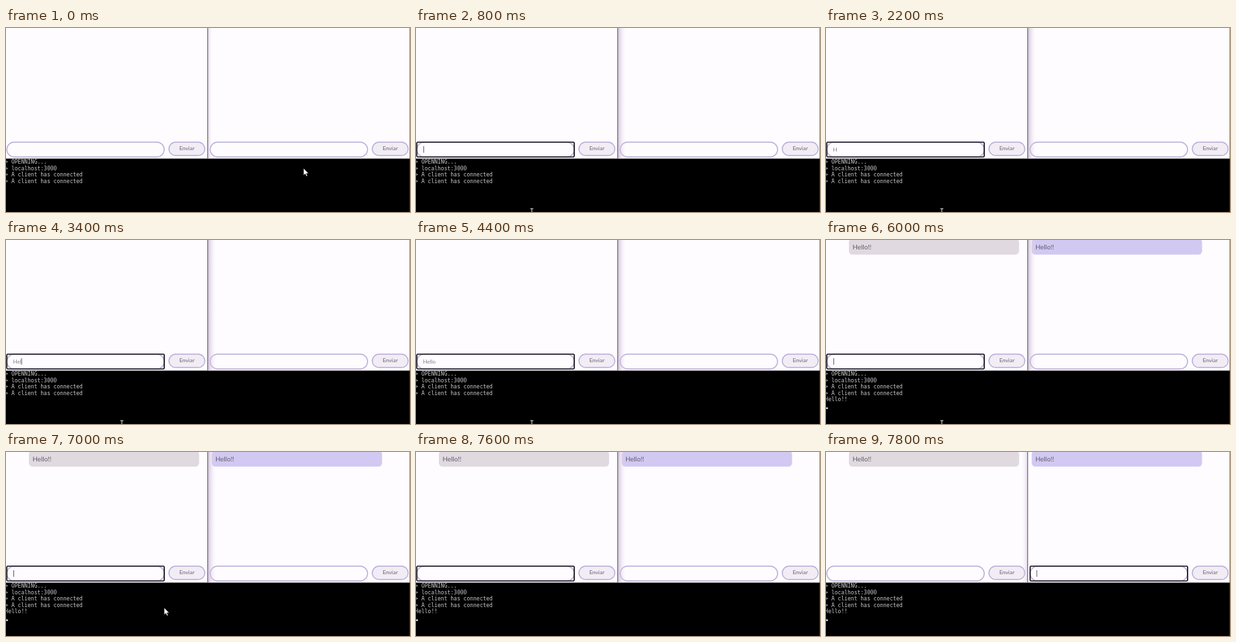
Write an HTML page that moves like this. It is 600x274 px and loops after 8000 ms.

```html
<!DOCTYPE html>
<html lang="es">
<head>
<meta charset="utf-8">
<title>Chat</title>
<style>
  html, body { margin: 0; width: 100%; height: 100%; overflow: hidden; background: #000; }
  svg { display: block; width: 100%; height: 100%; }
  text { font-family: Lato, "Open Sans", sans-serif; white-space: pre; }
  .field { fill: #fefcff; stroke: #b9abd9; stroke-width: 1.4; }
  .button { fill: #f2ecf5; stroke: #b9abd9; stroke-width: 1.4; }
  .label { font-size: 8.3px; fill: #6b646f; text-anchor: middle; }
  .focus { fill: none; stroke: #15111c; stroke-width: 1.7; }
  .typed { font-size: 8px; fill: #85798c; }
  .message { font-size: 9.8px; fill: #625b68; }
  .terminal text { font: 8px "DejaVu Sans Mono", monospace; fill: #c8c8c8; }
  .caret { fill: #55465f; }
</style>
</head>
<body>
<svg viewBox="0 0 600 274" preserveAspectRatio="none">
  <defs>
    <linearGradient id="shade">
      <stop offset="0" stop-color="#bda9c6" stop-opacity=".7"/>
      <stop offset=".4" stop-color="#d9c8e0" stop-opacity=".45"/>
      <stop offset="1" stop-color="#eadff0" stop-opacity="0"/>
    </linearGradient>
    <g id="chat">
      <rect class="field" x="1.2" y="170" width="233.8" height="22" rx="11"/>
      <rect class="button" x="242" y="170" width="53.3" height="19.8" rx="9.9"/>
      <text class="label" x="268.7" y="182.3">Enviar</text>
    </g>
    <rect id="ring" class="focus" x="1.2" y="170" width="233.8" height="22" rx="1.5"/>
  </defs>

  <rect width="600" height="274"/>
  <rect width="600" height="194.5" fill="#fefcff"/>

  <g id="messages">
    <rect x="34" y="-2" width="252.7" height="23.8" rx="5.5" fill="#e0d9e0"/>
    <text class="message" x="39.5" y="13.8">Hello!!</text>
    <rect x="305.5" y="-2" width="253" height="23.8" rx="5.5" fill="#d2c9f2"/>
    <text class="message" x="311" y="13.8">Hello!!</text>
  </g>

  <use href="#chat"/>
  <use href="#chat" x="302"/>
  <rect id="shadow" y="0" height="194.5" fill="url(#shade)"/>
  <rect x="298.9" width="1.2" height="194.5" fill="#716a76"/>
  <rect x="599.2" width=".8" height="194.5" fill="#8d7b82"/>
  <rect x="599.2" y="194.5" width=".8" height="79.5" fill="#6e1818"/>

  <use id="focusLeft" href="#ring"/>
  <use id="focusRight" href="#ring" x="302"/>
  <text id="typed" class="typed" x="10.6" y="183.7"></text>
  <path id="spelling" fill="none" stroke="#e0557f" stroke-width=".9"/>
  <rect id="caret" class="caret" y="176" width=".9" height="9.8"/>

  <g class="terminal">
    <text x="-1.7" y="202.4">&gt; OPENNING...</text>
    <text x="-1.7" y="211.9">&gt; localhost:3000</text>
    <text x="-1.7" y="221.4">&gt; A client has connected</text>
    <text x="-1.7" y="230.9">&gt; A client has connected</text>
    <g id="log">
      <text x="-1.7" y="240.4">Hello!!</text>
      <rect x="0" y="249.5" width="3" height="2" fill="#eee"/>
    </g>
  </g>

  <path id="arrow" d="M0 0V10.2L2.4 8 4 11.7 5.6 11 4 7.4H7.2Z" fill="#fff" stroke="#222" stroke-width=".5"/>
  <path id="beam" d="M-2.3 0H2.3M0 0V8M-2.3 8H2.3" fill="none" stroke-width="1"/>
</svg>
<script>
const LOOP = 8000;
const $ = id => document.getElementById(id);
const show = (id, on) => $(id).style.display = on ? "" : "none";

// Each table holds [start in ms, value...]; the latest started row applies.
const typing = [[0, ""], [1600, "H"], [3200, "He"], [3400, "Hel"], [3600, "Hell"],
  [3800, "Hello"], [5000, "Hello!"], [5200, "Hello!!"], [6000, ""]];
const blink = [[0, false], [800, true], [1400, false], [1600, true], [2200, false],
  [2800, true], [4400, false], [4800, true], [5800, false], [6000, true],
  [6400, false], [7000, true], [7600, false], [7800, true]];
const pointer = [[0, "arrow", 442, 209], [200, "arrow", 350, 136], [400, "beam", 215, 173],
  [600, "beam", 180, 179], [800, "beam", 172, 269], [7000, "arrow", 235, 232],
  [7200, "arrow", 340, 207], [7400, "beam", 420, 177], [7600, "none", 0, 0]];
const focus = [[0, "terminal"], [600, "left"], [7800, "right"]];
const shadows = { terminal: [300, 6, .7], left: [300, 11, 1], right: [291, 8, .6] };

const at = (table, t) => table.findLast(row => row[0] <= t).slice(1);

function wave(from, to) {
  let d = `M${from} 185.6`;
  for (let x = from, up = true; x < to; x += 1.5, up = !up) d += `l1.5 ${up ? -.7 : .7}`;
  return d;
}

function placePointer(t) {
  const [kind, x, y] = at(pointer, t);
  for (const id of ["arrow", "beam"]) {
    show(id, id === kind);
    $(id).setAttribute("transform", `translate(${x} ${y})`);
  }
  $("beam").setAttribute("stroke", y > 194 ? "#e8e8e8" : "#333");
}

function draw(t) {
  const [active] = at(focus, t);
  const [x, width, opacity] = shadows[active];
  const shadow = $("shadow");
  shadow.setAttribute("x", x);
  shadow.setAttribute("width", width);
  shadow.setAttribute("opacity", opacity);
  shadow.setAttribute("transform", active === "right" ? `translate(${2 * x + width} 0) scale(-1 1)` : "");

  show("focusLeft", active === "left");
  show("focusRight", active === "right");
  show("messages", t >= 6000);
  show("log", t >= 5800);
  show("spelling", t >= 5800 && t < 6000);

  const [text] = at(typing, t);
  $("typed").textContent = text;
  const end = text ? 10.6 + $("typed").getComputedTextLength() : 11;
  $("caret").setAttribute("x", active === "right" ? 312.6 : end);
  show("caret", at(blink, t)[0]);
  placePointer(t);
}

$("spelling").setAttribute("d", wave(11, 32));
const start = performance.now();
function tick() {
  draw((performance.now() - start) % LOOP);
  requestAnimationFrame(tick);
}
tick();
</script>
</body>
</html>
```
